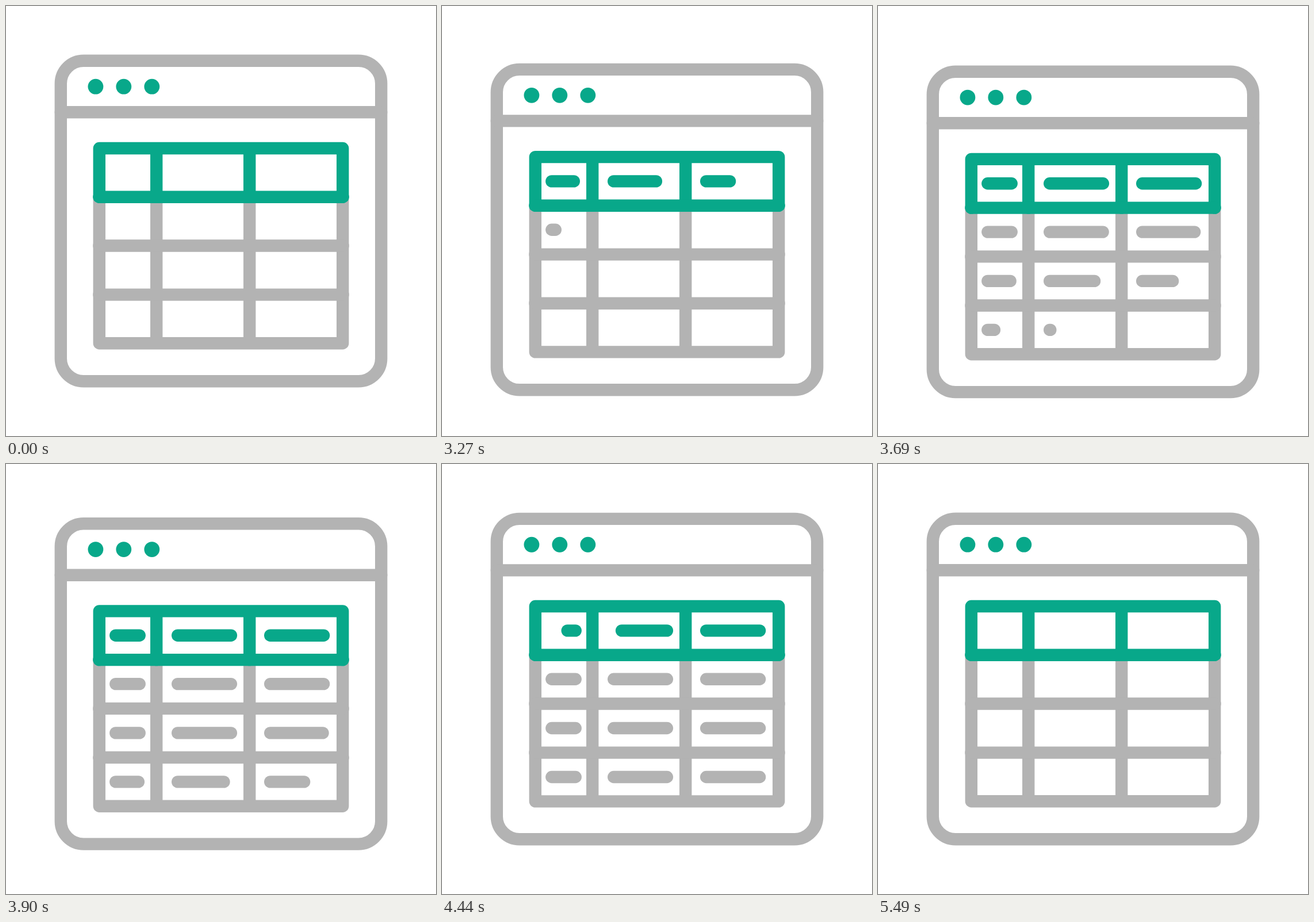
Recreate the animation shown at these times as an HTML page. Size 748x748 px, loop 5520 ms.

```html
<!DOCTYPE html>
<html lang="en">
<head>
<meta charset="utf-8">
<title>Table window</title>
<style>
  html, body { margin: 0; width: 100%; height: 100%; overflow: hidden; background: #fff; }
  svg { display: block; width: 100vw; height: 100vh; }
  .ink { fill: none; stroke-width: 21.4; stroke-linecap: round; stroke-linejoin: round; }
  .grey { stroke: #b3b3b3; }
  .green { stroke: #08a88a; }
</style>
</head>
<body>
<svg viewBox="0 0 748 748">
  <g id="window">
    <g class="ink grey">
      <rect x="95.3" y="95.3" width="557.4" height="557.4" rx="39.5"/>
      <path d="M95.3 184.8H652.7"/>
      <path d="M162.3 332.2V586.8H585.7V332.2M261.7 332.2V586.8M423.7 332.2V586.8"/>
      <path d="M161.9 417H586.1M161.9 502.1H586.1"/>
    </g>
    <g class="ink green">
      <path d="M162.3 332.2V247.5H585.7V332.2M261.7 247.5V332.2M423.7 247.5V332.2"/>
      <path d="M161.9 332.2H586.1"/>
    </g>
    <g fill="#08a88a">
      <circle cx="155.9" cy="140.2" r="13.4"/>
      <circle cx="204.8" cy="140.2" r="13.4"/>
      <circle cx="253.8" cy="140.2" r="13.4"/>
    </g>
    <g id="bars" class="ink"></g>
  </g>
</svg>
<script>
const LOOP = 5520, STEP = 30, STAGGER = 66, WEIGHT = 21.4;
const FILL_START = 3015, ERASE_START = 4328, NARROW_LEAD = 44;
const COLS = [[190.8, 232.2], [298.7, 391.4], [459.7, 552.6]];
const ROWS = [289.8, 374.2, 459.5, 544.5];

// [age in ms, value] knots
const FILL = [[0, 0], [15, .012], [57, .157], [81, .28], [123, .44], [147, .57],
  [189, .795], [213, .84], [255, .93], [279, .95], [345, .98], [420, 1]];
const ERASE = [[0, 0], [10, .005], [76, .27], [120, .5], [142, .61], [208, .85], [274, 1]];
const THICK = [[0, WEIGHT], [295, WEIGHT], [318, 20], [340, 18], [370, 11], [400, 0]];

function sample(knots, x) {
  if (x <= knots[0][0]) return knots[0][1];
  for (let i = 1; i < knots.length; i++) {
    const [x0, y0] = knots[i - 1], [x1, y1] = knots[i];
    if (x < x1) return y0 + (y1 - y0) * (x - x0) / (x1 - x0);
  }
  return knots[knots.length - 1][1];
}

// Ease with horizontal tangents at both ends
function ease(a, b, u) {
  if (u <= 0) return 0;
  if (u >= 1) return 1;
  let lo = 0, hi = 1, s = .5;
  for (let i = 0; i < 24; i++) {
    s = (lo + hi) / 2;
    const r = 1 - s;
    if (3 * r * r * s * a + 3 * r * s * s * b + s * s * s < u) lo = s; else hi = s;
  }
  return s * s * (3 - 2 * s);
}

function drop(t) {
  return t < 3500
    ? 24.8 * ease(.32, .62, (t - 2990) / 510)
    : 24.8 * (1 - ease(.244, .242, (t - 3500) / 1000));
}

const win = document.getElementById("window");
const group = document.getElementById("bars");
const bars = ROWS.flatMap((y, row) => COLS.map(([left, right], col) => {
  const line = document.createElementNS("http://www.w3.org/2000/svg", "line");
  line.setAttribute("class", row ? "grey" : "green");
  line.setAttribute("y1", y);
  line.setAttribute("y2", y);
  group.append(line);
  const delay = (row * COLS.length + col) * STAGGER;
  return {
    line, left, right,
    fillAt: FILL_START + delay,
    eraseAt: ERASE_START + delay - (col ? 0 : NARROW_LEAD)
  };
}));

function drawBar({ line, left, right, fillAt, eraseAt }, t) {
  const span = right - left;
  const start = left + span * sample(ERASE, t - eraseAt);
  const end = left + span * sample(FILL, t - fillAt);
  line.setAttribute("x1", start);
  line.setAttribute("x2", Math.max(end, start + .01));
  line.style.strokeWidth = t < fillAt ? 0 : sample(THICK, t - eraseAt);
}

function render(time) {
  const t = Math.floor((time % LOOP) / STEP) * STEP;
  win.setAttribute("transform", `translate(0 ${drop(t).toFixed(2)})`);
  bars.forEach(bar => drawBar(bar, t));
}

const origin = performance.now();
function tick() {
  render(performance.now() - origin);
  requestAnimationFrame(tick);
}
tick();
</script>
</body>
</html>
```
